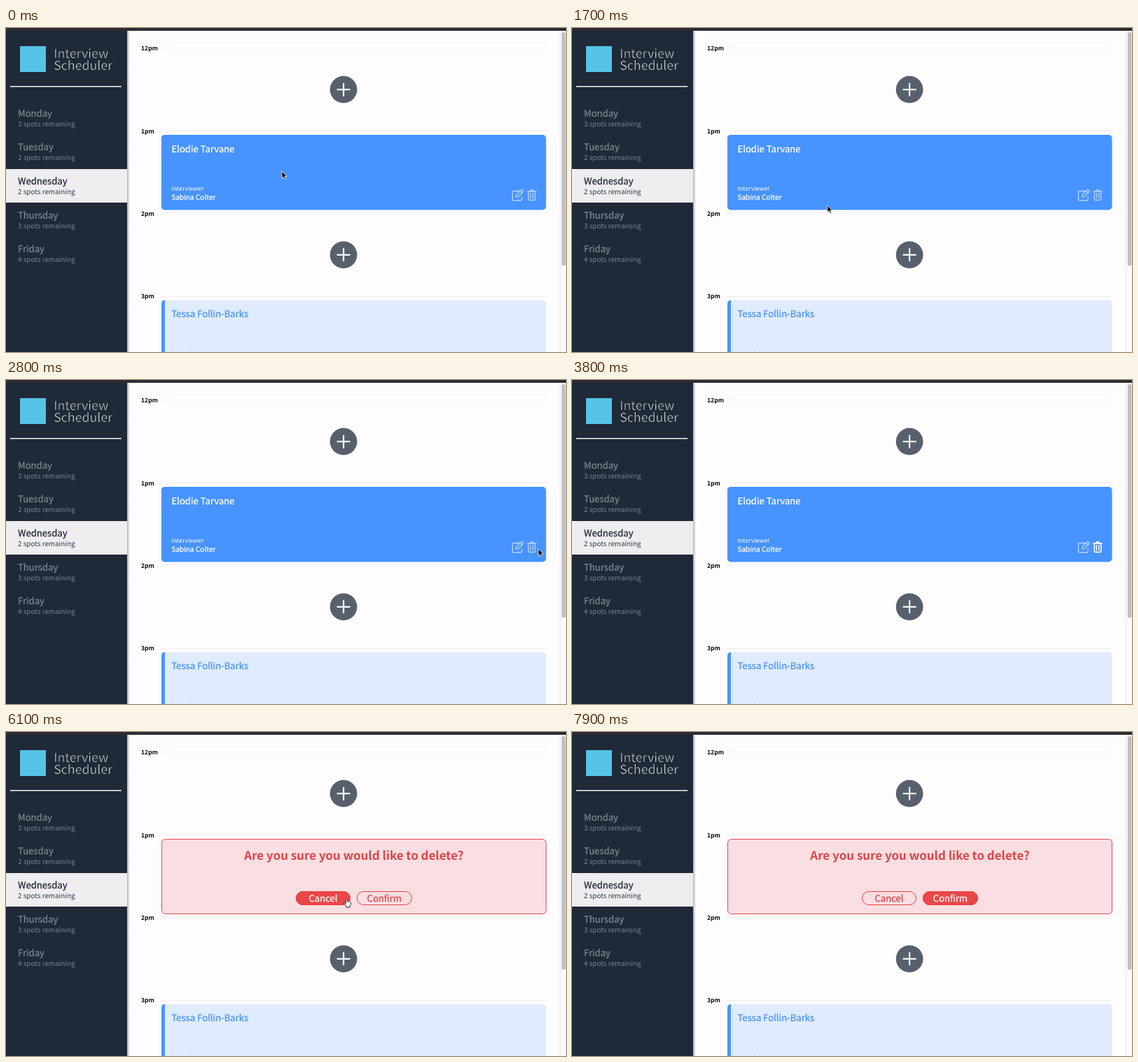
An HTML page for the animation above (8 s loop, 800 by 464 pixels).

```html
<!DOCTYPE html>
<html lang="en">
<head>
<meta charset="utf-8">
<title>Interview Scheduler</title>
<style>
  html, body { margin: 0; width: 100%; height: 100%; overflow: hidden; background: #fefcff; }
  svg {
    display: block; width: 800px; height: 464px;
    font: 13.1px "Noto Sans CJK JP", "Noto Sans CJK SC", "Noto Sans CJK", "Open Sans", sans-serif;
    text-rendering: geometricPrecision;
  }

  /* a stroke in the ground colour thins the letters, one in their own colour thickens them */
  .brand { font-size: 17.8px; fill: #d5d9de; stroke: #1f2937; stroke-width: .45; }
  .days { color: #7f8791; }
  .days .now { color: #1f2937; }
  .sub { font-size: 9.9px; fill: #7b848e; }
  .sub.now { fill: #303a47; }
  .hour { font-size: 8.6px; font-weight: 700; fill: #0b0b0d; }
  .rule { stroke: #ececf0; }

  .rest { color: #4793ff; fill: #e0ecfd; }
  .hot { color: #fff; fill: #4793ff; }
  .ink { fill: currentColor; stroke: currentColor; stroke-width: .25; }
  .role { font-size: 8.6px; fill: currentColor; }
  .person { font-size: 10px; }
  .icon { fill: none; stroke: #fff; stroke-width: 1.3; stroke-linejoin: round; stroke-linecap: round; }
  .dim { opacity: .62; }

  .ask { font-size: 16.95px; font-weight: 700; fill: #de4347; }
  .mid { text-anchor: middle; }
  .off { color: #de4347; fill: #fadee1; }
  .on { color: #fff; fill: #eb4648; }

  .flip { animation: 8s step-end infinite; }
  .card2 { animation-name: card2; }
  .card3 { animation-name: card3; }
  .bin { animation-name: bin; }
  .dialog { animation-name: dialog; }
  .cancel { animation-name: cancel; }
  .confirm { animation-name: confirm; }
  .arrow { animation-name: arrow; }
  .hand { animation-name: hand; }
  .pointer { animation: move 8s linear infinite; }

  @keyframes card2 {
    0%, 21%, 33.8% { opacity: 1; }
    6.5%, 28% { opacity: 0; }
    100% { opacity: 1; }
  }
  @keyframes card3 {
    0%, 16.4%, 100% { opacity: 0; }
    11.9% { opacity: 1; }
  }
  @keyframes bin {
    0%, 55%, 100% { opacity: 0; }
    40.6% { opacity: 1; }
  }
  @keyframes dialog {
    0% { opacity: 0; }
    55%, 100% { opacity: 1; }
  }
  @keyframes cancel {
    0%, 81.6%, 100% { opacity: 0; }
    68.6% { opacity: 1; }
  }
  @keyframes confirm {
    0%, 68.4% { opacity: 0; }
    66.1%, 82.3%, 100% { opacity: 1; }
  }
  @keyframes arrow {
    0%, 55% { opacity: 1; }
    40.6%, 66.1%, 100% { opacity: 0; }
  }
  @keyframes hand {
    0%, 91.2%, 100% { opacity: 0; }
    66.1% { opacity: 1; }
  }
  @keyframes move {
    0%, 3.75% { transform: translate(394px, 205px); }
    10% { transform: translate(378px, 330px); }
    12.5% { transform: translate(372px, 410px); }
    15.625% { transform: translate(370px, 410px); }
    21.25% { transform: translate(364.5px, 254px); }
    23.125% { transform: translate(400px, 238px); }
    28.125%, 33.125% { transform: translate(776px, 246px); }
    37.5% { transform: translate(740px, 236px); }
    41.25% { transform: translate(751px, 238px); }
    47.5%, 61.25% { transform: translate(753px, 239.5px); }
    68.75%, 81.25% { transform: translate(487px, 239.5px); }
    85%, 100% { transform: translate(540px, 239.5px); }
  }
</style>
</head>
<body>
<svg viewBox="0 0 800 464">
  <defs>
    <linearGradient id="shade">
      <stop offset="0" stop-color="#555b66" stop-opacity=".45"/>
      <stop offset="1" stop-color="#555b66" stop-opacity="0"/>
    </linearGradient>
    <g id="plus">
      <circle r="19.4" fill="#57606c"/>
      <path d="M-9.5 0H9.5M0 -9.5V9.5" fill="none" stroke="#f6f6f8" stroke-width="2.2"/>
    </g>
    <g id="box">
      <rect x="222" y="153" width="549.5" height="107.5" rx="5"/>
      <path d="M227 153v107.5a5 5 0 0 1-5-5v-97.5a5 5 0 0 1 5-5z" fill="#4793ff"/>
      <text class="role" x="236.5" y="233">Interviewer</text>
    </g>
    <g id="booking2">
      <use href="#box"/>
      <text class="ink" x="236.5" y="178">Elodie Tarvane</text>
      <text class="ink person" x="236.5" y="245.5">Sabina Colter</text>
    </g>
    <g id="booking3">
      <use href="#box"/>
      <text class="ink" x="236.5" y="177.5">Tessa Follin-Barks</text>
    </g>
    <path id="edit" d="M733.5 233.5H725a1.5 1.5 0 0 0-1.5 1.5v10.5a1.5 1.5 0 0 0 1.5 1.5h10.5a1.5 1.5 0 0 0 1.5-1.5v-4M728.5 242l.5-3 7.2-7.2a1 1 0 0 1 1.4 0l1.3 1.3a1 1 0 0 1 0 1.4l-7.2 7.2zM734.5 233.5l2.7 2.7"/>
    <path id="trash" d="M745 234H757M748.5 234l1-2.2h3l1 2.2M746.3 234v11a1.5 1.5 0 0 0 1.5 1.5h6.4a1.5 1.5 0 0 0 1.5-1.5v-11M749.3 237v6.5M752.7 237v6.5"/>
    <g id="no">
      <rect x="414.5" y="228.5" width="77" height="19" rx="9.5" stroke="#de4347"/>
      <text class="ink mid" x="453" y="242.7">Cancel</text>
    </g>
    <g id="yes">
      <rect x="501.5" y="228.5" width="78" height="19" rx="9.5" stroke="#de4347"/>
      <text class="ink mid" x="540.5" y="242.7">Confirm</text>
    </g>
  </defs>

  <rect width="800" height="464" fill="#fefcff"/>

  <!-- sidebar -->
  <rect x="173" width="4" height="464" fill="url(#shade)"/>
  <rect width="173" height="464" fill="#1f2937"/>
  <rect x="20" y="26" width="37" height="37" fill="#57c3e6"/>
  <g class="brand">
    <text x="68.2" y="42.7">Interview</text>
    <text x="68.2" y="59.7">Scheduler</text>
  </g>
  <rect x="6" y="83" width="159" height="1.5" fill="#f4f4f6"/>
  <rect y="202" width="173" height="48" fill="#efedf0"/>
  <g class="days">
    <text x="17" y="126.5" class="ink">Monday</text>
    <text x="17" y="140.6" class="sub">3 spots remaining</text>
    <text x="17" y="175.2" class="ink">Tuesday</text>
    <text x="17" y="189.3" class="sub">2 spots remaining</text>
    <text x="17" y="223.9" class="ink now">Wednesday</text>
    <text x="17" y="238" class="sub now">2 spots remaining</text>
    <text x="17" y="272.6" class="ink">Thursday</text>
    <text x="17" y="286.7" class="sub">3 spots remaining</text>
    <text x="17" y="321.3" class="ink">Friday</text>
    <text x="17" y="335.4" class="sub">4 spots remaining</text>
  </g>

  <!-- schedule -->
  <path class="rule" d="M226 28.5H771.5M221 147.5H771.5M221 265.5H771.5M221 384.5H771.5"/>
  <g class="hour">
    <text x="193" y="32.2">12pm</text>
    <text x="193" y="150.6">1pm</text>
    <text x="193" y="269">2pm</text>
    <text x="193" y="387.4">3pm</text>
  </g>
  <use href="#plus" x="482.2" y="88.2"/>
  <use href="#plus" x="482.2" y="324.8"/>

  <use href="#booking3" y="236.7" class="rest"/>
  <g class="flip card3">
    <use href="#booking3" y="236.7" class="hot"/>
  </g>

  <use href="#booking2" class="rest"/>
  <g class="flip card2">
    <use href="#booking2" class="hot"/>
    <g class="icon">
      <use href="#edit" class="dim"/>
      <use href="#trash" class="dim"/>
      <use href="#trash" class="flip bin"/>
    </g>
  </g>

  <g class="flip dialog">
    <rect x="221" y="152" width="551.5" height="109.5" fill="#fefcff"/>
    <rect x="222.5" y="153.5" width="549" height="107" rx="5" fill="#fadee1" stroke="#e34a4e"/>
    <text class="ask mid" x="497" y="183.1">Are you sure you would like to delete?</text>
    <use href="#no" class="off"/>
    <use href="#yes" class="off"/>
    <g class="flip cancel"><use href="#no" class="on"/></g>
    <g class="flip confirm"><use href="#yes" class="on"/></g>
  </g>

  <!-- window edges -->
  <rect x="791" width="9" height="464" fill="#faf9fb"/>
  <path d="M791.5 0V464" stroke="#e9e8eb"/>
  <rect x="793.8" y="6" width="5.7" height="334.5" rx="2.85" fill="#bfbec1"/>
  <rect width="800" height="4" fill="#2c2b31"/>

  <g class="pointer">
    <path class="flip arrow" d="M0 0V10.2L2.4 8 4 11.7 5.7 11 4.2 7.4H7.3z" fill="#000" stroke="#fff" stroke-width=".8"/>
    <path class="flip hand" d="M-1.4 .2Q-.4-1 .6 .2L1 3.2Q2 2.5 2.7 3.5 3.8 3 4.3 4.1 5.7 3.8 5.8 5.5 5.8 8 4.6 9.5V11H-1.2V9.6L-4.3 6.2Q-4.6 4.7-3.2 5L-1.4 6.4z" fill="#fff" stroke="#111" stroke-width=".9" stroke-linejoin="round"/>
  </g>
</svg>
</body>
</html>
```
